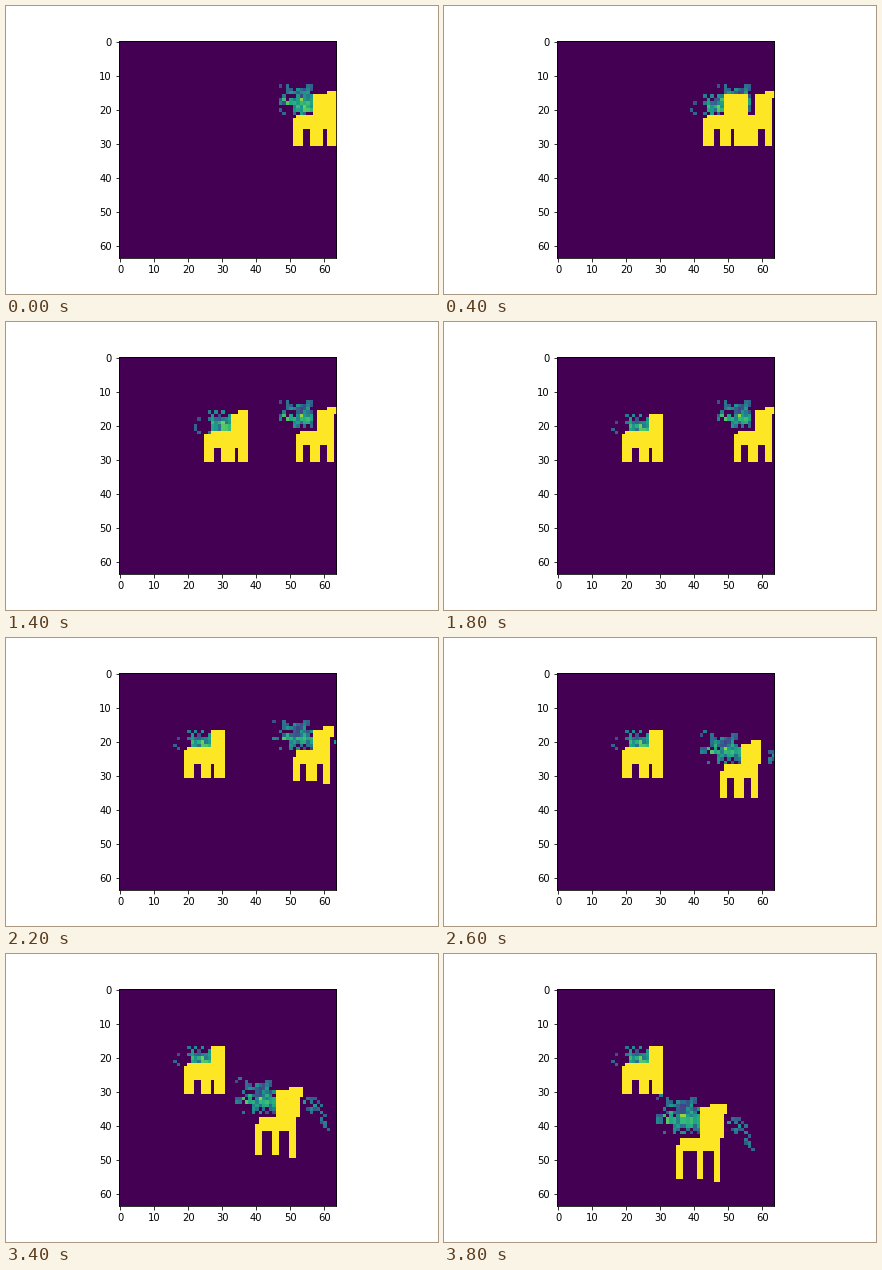
Animation of 432 by 288 pixels, one loop 4 s. Source, as a matplotlib script:

```python
import numpy as np
import matplotlib.pyplot as plt
from matplotlib.animation import FuncAnimation

N = 64
STEP = 200
FRAMES = 20


def speckle(rng, keep, glow):
    """Random dim cells, kept with chance `keep` and brightened by `glow`."""
    value = rng.uniform(0.2, 0.55, keep.shape)
    value += glow * rng.uniform(0.1, 0.5, keep.shape)
    return np.where(rng.random(keep.shape) < keep, value, 0)


def unit_grid(w, h):
    v, u = np.mgrid[0.5:h, 0.5:w]
    return u / w, v / h


def head_texture(seed, w, h):
    u, v = unit_grid(w, h)
    keep = 1.2 * np.exp(-((u - 0.7) / 0.42) ** 2 - ((v - 0.6) / 0.42) ** 2)
    band = np.exp(-((v - 0.66) / 0.16) ** 2) * (u > 0.25)
    return speckle(np.random.default_rng(seed), keep, band)


def tail_texture(seed, w=8, h=11):
    u, v = unit_grid(w, h)
    keep = 0.45 * (np.abs(v - 0.1 - 0.65 * u) < 0.28)
    return speckle(np.random.default_rng(seed), keep, 0 * u)


class Animal:
    """Walks from one shape to another; a shape is
    x, y, width, height in cells, then neck, leg, back, belly, lean
    as fractions of that size."""

    def __init__(self, span, ease, first, last, head_box, head, tail=None):
        self.span, self.ease = span, ease
        self.first, self.last = np.array(first), np.array(last)
        self.head_box, self.head, self.tail = head_box, head, tail

    def shape(self, t):
        t0, t1 = self.span
        k = np.clip((t - t0) / (t1 - t0), 0, 1) ** self.ease
        return self.first + k * (self.last - self.first)

    def draw(self, grid, t):
        x, y, w, h, neck, leg, back, belly, lean = self.shape(t)

        def place(u0, v0, u1, v1):
            return x + u0 * w, y + v0 * h, x + u1 * w, y + v1 * h

        left, top, bottom = self.head_box
        stamp(grid, place(left, top, neck, bottom), self.head)
        if self.tail is not None:
            stamp(grid, place(1.12, 0.13, 1.77, 0.62), self.tail)
        fill(grid, place(neck, 0.05, 1 + 0.3 * lean, back))
        fill(grid, place(0.8, 0, 1 + lean, 0.15))
        fill(grid, place(0.1, back, 1, belly))
        fill(grid, place(0, back + 0.08, leg, 0.98))
        fill(grid, place(0.52 - 0.6 * leg, belly, 0.52 + 0.6 * leg, 0.97))
        fill(grid, place(1 - leg, belly, 1, 1))


def fill(grid, box):
    x0, y0, x1, y1 = (int(np.clip(np.floor(c + 0.5), 0, N)) for c in box)
    grid[y0:y1, x0:x1] = 1


def stamp(grid, box, texture):
    x0, y0, x1, y1 = box
    h, w = texture.shape
    mid = np.arange(N) + 0.5
    col = np.floor((mid - x0) / (x1 - x0) * w).astype(int)
    row = np.floor((mid - y0) / (y1 - y0) * h).astype(int)
    xs = np.flatnonzero((col >= 0) & (col < w))
    ys = np.flatnonzero((row >= 0) & (row < h))
    area = np.ix_(ys, xs)
    grid[area] = np.maximum(grid[area], texture[np.ix_(row[ys], col[xs])])


lead = Animal((0, 1800), 0.9,
              (51, 15.3, 13.5, 15.7, 0.45, 0.23, 0.41, 0.7, 0),
              (19, 16.7, 12, 14.3, 0.67, 0.22, 0.38, 0.71, 0),
              (-0.26, 0, 0.42), head_texture(4, 11, 6))
rear = Animal((2000, 3800), 1.25,
              (52, 15, 11, 16, 0.5, 0.19, 0.43, 0.67, 0.08),
              (35, 34, 13, 22.5, 0.54, 0.15, 0.45, 0.6, 0.15),
              (-0.57, -0.16, 0.4), head_texture(11, 13, 11), tail_texture(7))


def scene(i):
    grid = np.zeros((N, N))
    for animal in (rear, lead):
        animal.draw(grid, i * STEP)
    return grid


fig, ax = plt.subplots(figsize=(6, 4), dpi=72)
fig.subplots_adjust(left=0.125, right=0.9, bottom=0.125, top=0.88)
image = ax.imshow(scene(0), cmap="viridis", vmin=0, vmax=1,
                  interpolation="nearest")
ax.set_xticks(range(0, N, 10))
ax.set_yticks(range(0, N, 10))


def update(i):
    image.set_data(scene(i))
    return [image]


anim = FuncAnimation(fig, update, frames=FRAMES, interval=STEP,
                     repeat=True, repeat_delay=0)
plt.show()
```
